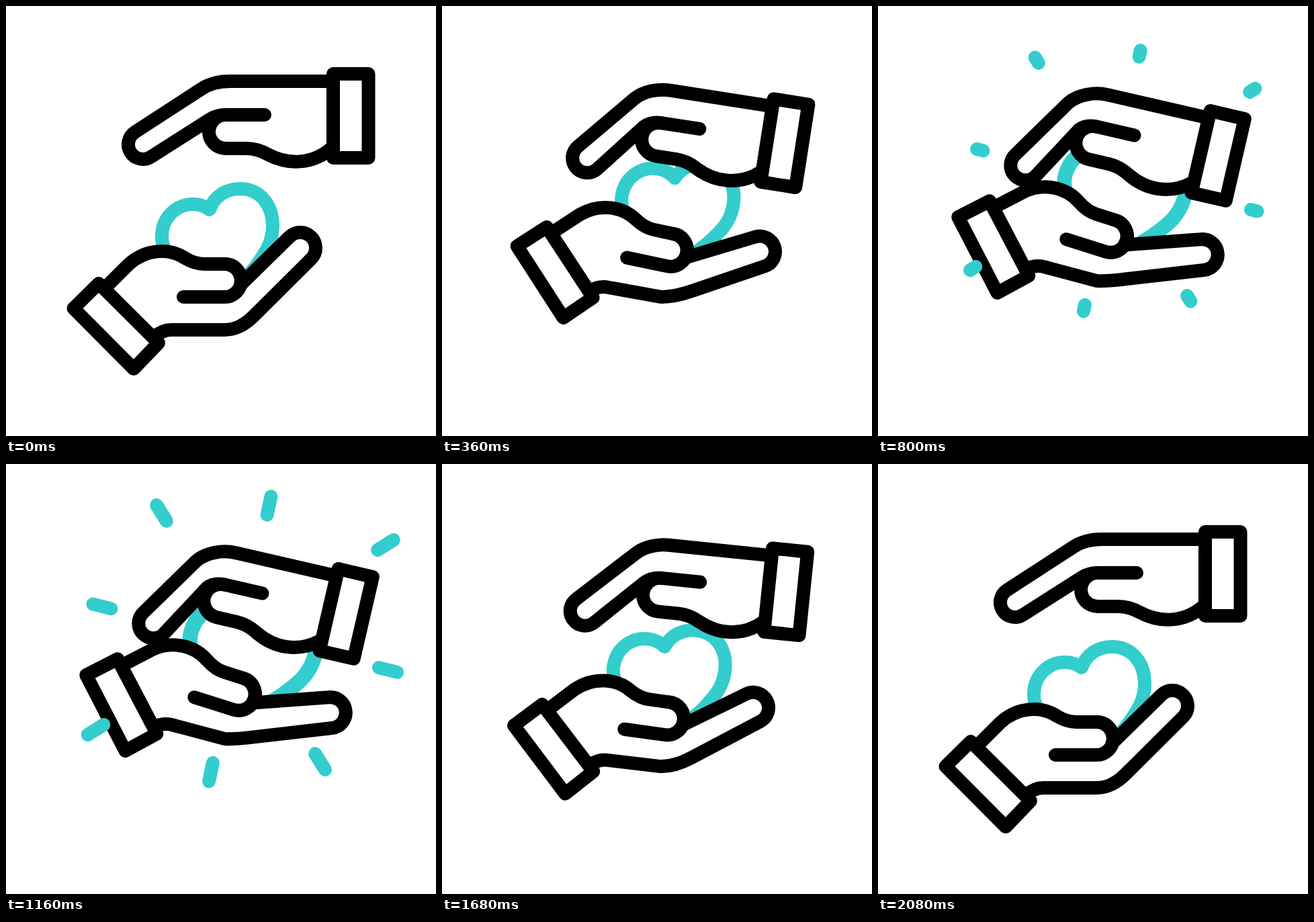
Recreate the animation shown at these times as an HTML page. Size 640x640 px, loop 2.44 s.

```html
<!DOCTYPE html>
<html lang="en">
<head>
<meta charset="utf-8">
<title>Caring hands</title>
<style>
  html, body { margin: 0; width: 100%; height: 100%; overflow: hidden; background: #fff; }
  svg { display: block; width: 100%; height: 100%; }
  path, line { fill: none; stroke: #000; stroke-width: 20; stroke-linecap: round; stroke-linejoin: round; }
  .solid { fill: #fff; }
  .teal path, .teal line { stroke: #33cdcd; }
</style>
</head>
<body>
<svg viewBox="0 0 640 640">
  <g id="heart" class="teal">
    <path d="M303 303C309 285 326 272 348 272C379 272 397 297 397 327C397 353 385 368 372 387L345 420L290 395C250 385 232 366 232 343C232 315 253 295 279 295C288 295 296 298 303 303Z"/>
  </g>
  <g id="lower">
    <path id="lowerSkin" class="solid"/>
    <path d="M325.5 384A24.5 24.5 0 0 1 325.5 433H264"/>
    <path class="solid" d="M100.5 450L138 413L227 501.500L190 540Z"/>
  </g>
  <g id="upper">
    <path id="upperSkin" class="solid"/>
    <path d="M327 162H385"/>
    <path class="solid" d="M487 101H539.500V226H487Z"/>
  </g>
  <g id="rays" class="teal"></g>
</svg>
<script>
const LOOP = 2440, STEP = 40;
const CLOSED = 667, BEAT = 1000, OPENING = 1323, OPEN = 1990;
const $ = id => document.getElementById(id);
const mix = (a, b, t) => a + (b - a) * t;
const ramp = (ms, from, to) => Math.min(1, Math.max(0, (ms - from) / (to - from)));
const rad = deg => deg * Math.PI / 180;

// Cubic timing curve solved by bisection
function bezier(x1, y1, x2, y2) {
  const at = (a, b, s) => 3 * (1 - s) ** 2 * s * a + 3 * (1 - s) * s * s * b + s ** 3;
  return x => {
    if (x <= 0 || x >= 1) return x <= 0 ? 0 : 1;
    let lo = 0, hi = 1;
    for (let i = 0; i < 24; i++) {
      const mid = (lo + hi) / 2;
      if (at(x1, x2, mid) < x) lo = mid; else hi = mid;
    }
    return at(y1, y2, lo);
  };
}
const arrive = bezier(.167, .167, .667, 1);
const ease = bezier(.333, 0, .667, 1);

// Centre x, centre y, outward angle
const rays = [
  [231.5, 73, 238], [391.5, 62, -78], [565, 120.5, -32], [568.5, 306.5, 14],
  [467.5, 443, 58], [305, 458.5, 102], [133.5, 395.5, 148], [143, 212, 194]
].map(([x, y, angle]) => {
  const line = document.createElementNS('http://www.w3.org/2000/svg', 'line');
  line.setAttribute('transform', `translate(${x} ${y}) rotate(${angle})`);
  $('rays').append(line);
  return line;
});

// Both edges of a fingertip, either side of its centre
function tip(x, y, r, angle) {
  const nx = r * Math.sin(rad(angle)), ny = r * Math.cos(rad(angle));
  return [`${x - nx} ${y - ny}`, `${x + nx} ${y + ny}`];
}

function lowerSkin(t) {
  const slope = mix(45, 24, t);
  const [top, bottom] = tip(mix(438, 464, t), mix(360, 394, t), 23, slope);
  const cx = 368 - 17 * Math.cos(rad(slope)), cy = 462 + 17 * Math.sin(rad(slope));
  return `M149 418L182 385C208 361 243 360 266 375C276 381 284 384 295 384H325.5
    A24.5 24.5 0 0 1 349 415L${top}A23 23 0 0 1 ${bottom}L368 462
    C${cx} ${cy} 341 ${mix(482, 474.5, t)} 325 ${mix(482, 478.5, t)}L246 482C236 482 228 486 220 493`;
}

function upperSkin(t) {
  const [top, bottom] = tip(mix(204, 237, t), mix(206, 242, t), 22, mix(33, 56.5, t));
  return `M487 112H333C${mix(318, 312, t)} 112 ${mix(303, 290, t)} ${mix(115, 122, t)}
    ${mix(290, 279, t)} ${mix(124, 136, t)}L${top}A22 22 0 0 0 ${bottom}
    L303 ${mix(169, 172, t)}C309 165 317 162 327 162A25 25 0 0 0 327 212H358
    C372 212 381 216 390 221C420 237 457 236 485 211`;
}

function draw(ms) {
  const t = arrive(ramp(ms, 0, CLOSED)) - ease(ramp(ms, OPENING, OPEN));
  const beat = ease(ramp(ms, CLOSED, BEAT)) - ease(ramp(ms, BEAT, 1333));

  $('upper').setAttribute('transform', `rotate(${13 * t} 249 162)`);
  $('lower').setAttribute('transform', `translate(${20.3 * t} ${-85.8 * t}) rotate(${17.5 * t} 262 420)`);
  $('heart').setAttribute('transform',
    `translate(${315 + 52 * t} ${337 - 66 * t}) rotate(${19 * t}) scale(${1 + .24 * beat}) translate(-315 -337)`);
  $('upperSkin').setAttribute('d', upperSkin(t));
  $('lowerSkin').setAttribute('d', lowerSkin(t));

  const head = ease(ramp(ms, CLOSED, BEAT)), tail = ease(ramp(ms, 1160, 1400));
  $('rays').style.display = head > tail ? '' : 'none';
  for (const ray of rays) {
    ray.setAttribute('x1', mix(-14, 14, tail));
    ray.setAttribute('x2', mix(-14, 14, head));
  }
}

const start = performance.now();
function tick() {
  const ms = (performance.now() - start) % LOOP;
  draw(Math.floor(ms / STEP) * STEP);
  requestAnimationFrame(tick);
}
tick();
</script>
</body>
</html>
```
